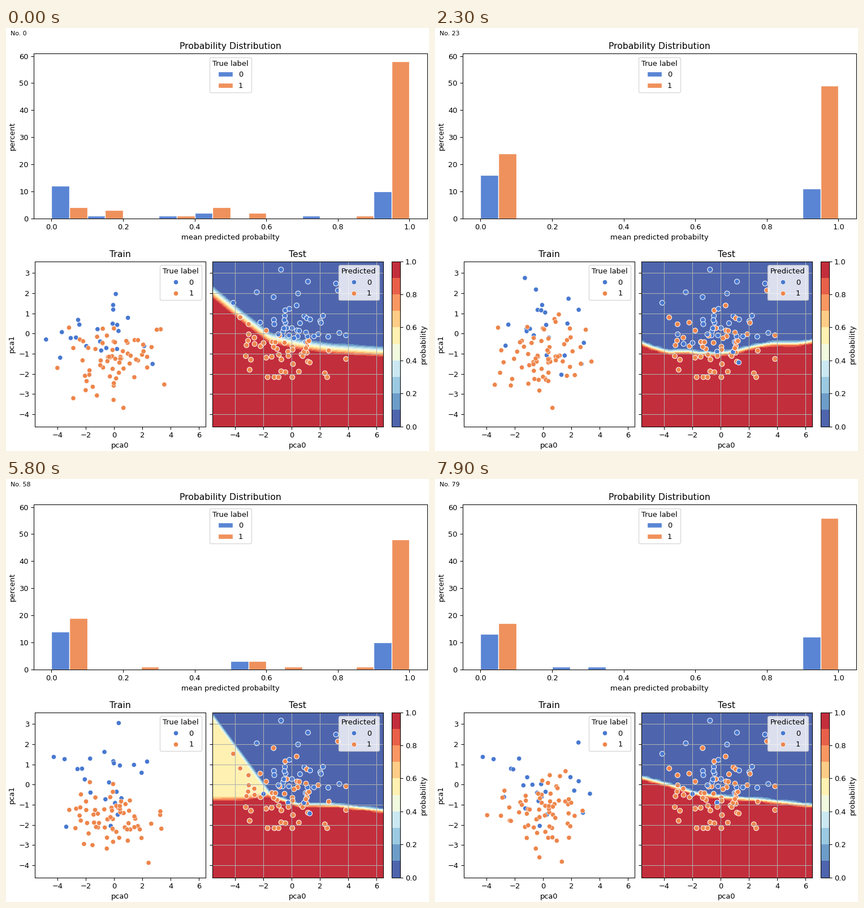
Write a matplotlib script that moves like this. It is 748 by 748 pixels and loops after 8000 ms.

```python
import numpy as np
import matplotlib.pyplot as plt
from matplotlib.animation import FuncAnimation
from matplotlib.cm import ScalarMappable
from matplotlib.colors import BoundaryNorm, ListedColormap, to_rgba
from matplotlib.lines import Line2D
from matplotlib.patches import Patch

SIZE, INCHES, FRAMES = 748, 8, 80
COLORS = ["#4878d0", "#ee854a"]
RGBA = np.array([to_rgba(c) for c in COLORS])
XLIM, YLIM = (-5.6, 6.45), (-4.6, 3.575)
TOTALS = np.array([27, 73])
LIFE = 30  # frames a training point stays in the sliding window

KEYS = np.array([0, 14, 32, 44, 58, 70, 79])

# Per key time and label: share in the first bin, then {bin: count} between
# the first and the last bin; the last bin takes the rest.
LOW = [(12, 4), (17, 28), (16, 19), (17, 25), (14, 19), (12, 10), (13, 17)]
MIDDLE = [
    ({1: 1, 3: 1, 4: 2, 7: 1}, {1: 3, 3: 1, 4: 4, 5: 2, 8: 1}),
    ({}, {}),
    ({}, {2: 1, 7: 1}),
    ({3: 1}, {3: 1}),
    ({5: 3}, {2: 1, 5: 3, 6: 1, 8: 1}),
    ({7: 1, 8: 5}, {8: 6}),
    ({2: 1, 3: 1}, {}),
]

# Decision boundary: heights at a few x positions per key time.
NODES = [-5.6, -3.6, -1.6, .4, 2.9, 6.45]
HEIGHTS = [
    [2.05, .88, -.2, -.53, -.75, -.91],
    [-.76, -1.78, -1.57, -.87, -.42, .33],
    [.03, -.2, -.52, -.8, -1, -.9],
    [-.66, -.74, -.76, -.98, -1.01, -1.04],
    [-.75, -.73, -.55, -1, -1.03, -1.3],
    [.55, .08, -.5, -.74, -1, -1.04],
    [.33, -.05, -.49, -.65, -.78, -1.05],
]
# Plateau of intermediate probability below a sloping line: intercept, slope.
WEDGE = {4: (-1.92, -.95), 5: (-1.03, -1.28)}
PLATEAU = np.array([.55, .55, .55, .55, .55, .85, .85])
WIDTH = np.array([.62, .3, .27, .25, .25, .28, .25])

rng = np.random.default_rng(7)


def blend(stack, i):
    k = min(np.searchsorted(KEYS, i, side="right") - 1, len(KEYS) - 2)
    f = (i - KEYS[k]) / (KEYS[k + 1] - KEYS[k])
    return (1 - f) * stack[k] + f * stack[k + 1]


def cloud(n, center, spread, low, high):
    return np.clip(rng.normal(center, spread, (n, 2)), low, high)


def stream(per_frame, *shape):
    """Points and the frames at which they enter the sliding window."""
    n = per_frame * (FRAMES + LIFE) // LIFE
    return cloud(n, *shape), np.linspace(-LIFE, FRAMES, n)


blue, blue_start = stream(23, (0, .35), (2, 1.2), (-4.8, -2.6), (5.9, 3.1))
orange, orange_start = stream(68, (0, -1.2), (1.75, .95), (-4, -4.2), (5, 1.55))
train_xy = np.vstack([blue, orange])
train_start = np.concatenate([blue_start, orange_start])
train_label = np.repeat([0, 1], [len(blue), len(orange)])

test_xy = cloud(93, (-.1, 0), (1.75, 1.25), (-5.08, -2.16), (3.84, 3.2))
# Offset of each test point along the components that are not shown.
hidden = np.maximum(rng.normal(.6, 1, len(test_xy)), -.4)

counts = np.zeros((len(KEYS), 2, 10))
for k, pair in enumerate(MIDDLE):
    counts[k, :, 0] = LOW[k]
    for label, bins in enumerate(pair):
        for b, n in bins.items():
            counts[k, label, b] = n

gx, gy = np.linspace(*XLIM, 81), np.linspace(*YLIM, 56)
lower = np.array([np.interp(gx, NODES, h) for h in HEIGHTS])
upper = lower.copy()
for k, (intercept, slope) in WEDGE.items():
    upper[k] = np.maximum(lower[k], intercept + slope * gx)


def edges(i):
    """Both boundary curves, slightly refitted on every frame."""
    phase = np.random.default_rng(i).uniform(0, 2 * np.pi)
    wobble = .03 * min(np.abs(KEYS - i).min(), 4) * np.sin(1.1 * gx + phase)
    return blend(lower, i) + wobble, blend(upper, i) + wobble


def probability(i, low, up):
    width, plateau = blend(WIDTH, i), blend(PLATEAU, i)

    def step(edge):
        w = width * np.clip(np.hypot(1, np.gradient(edge, gx)), 1, 2)
        return np.clip((edge - gy[:, None]) / w + .5, 0, 1)

    return np.clip(plateau * step(up) + (1 - plateau) * step(low), .001, .999)


fig = plt.figure(figsize=(INCHES, INCHES), dpi=SIZE / INCHES, facecolor="white")


def place(left, top, right, bottom):
    return fig.add_axes([left / SIZE, 1 - bottom / SIZE,
                         (right - left) / SIZE, (bottom - top) / SIZE])


def dot_legend(ax, title):
    handles = [Line2D([], [], ls="", marker="o", ms=6.4, mfc=c, mec="white",
                      mew=.5, label=str(n)) for n, c in enumerate(COLORS)]
    ax.legend(handles=handles, title=title, loc="upper right")


number = fig.text(7.5 / SIZE, 1 - 13 / SIZE, "", fontsize=8.5)

ax_hist = place(48.8, 45.2, 745.1, 336.5)
ax_hist.set(xlim=(-.05, 1.05), ylim=(0, 60.9), title="Probability Distribution",
            xlabel="mean predicted probabilty", ylabel="percent")
bar_styles = [dict(fc=to_rgba(c, .9), ec="white", lw=1) for c in COLORS]
bars = [ax_hist.bar(np.arange(10) / 10 + .05 * n, np.zeros(10), .05,
                    align="edge", **style) for n, style in enumerate(bar_styles)]
ax_hist.legend(handles=[Patch(label=str(n), **style)
                        for n, style in enumerate(bar_styles)],
               title="True label", loc="upper center")

ax_train = place(50.8, 412.6, 352.7, 704.5)
ax_test = place(365.4, 412.6, 666.5, 704.5)
for ax, title in ((ax_train, "Train"), (ax_test, "Test")):
    ax.set(xlim=XLIM, ylim=YLIM, title=title, xlabel="pca0",
           xticks=range(-4, 7, 2), yticks=range(-4, 4))
ax_train.set_ylabel("pca1")
ax_test.tick_params(labelleft=False)
ax_test.grid(True)
train_dots = ax_train.scatter([], [], s=41, lw=.5, ec="white")
test_dots = ax_test.scatter(*test_xy.T, s=46, lw=.8, ec="white")
dot_legend(ax_train, "True label")
dot_legend(ax_test, "Predicted")

levels = np.linspace(0, 1, 11)
bands = ListedColormap(.9 * plt.get_cmap("RdYlBu_r")(np.arange(.05, 1, .1)) + .1)
norm = BoundaryNorm(levels, 10)
colorbar = fig.colorbar(ScalarMappable(norm, bands), ticks=levels[::2],
                        cax=place(682.4, 412.6, 696.6, 704.5), label="probability")
colorbar.minorticks_off()
surface = []


def update(i):
    number.set_text(f"No. {i}")

    heights = np.rint(blend(counts, i))
    heights[:, 9] = TOTALS - heights[:, :9].sum(axis=1)
    for group, row in zip(bars, heights):
        for bar, h in zip(group, row):
            bar.set_height(h)
            bar.set_visible(h > 0)

    shown = (train_start <= i) & (i < train_start + LIFE)
    train_dots.set_offsets(train_xy[shown])
    train_dots.set_facecolor(RGBA[train_label[shown]])

    low, up = edges(i)
    x, y = test_xy.T
    drift = .2 + 1.6 * min(i / KEYS[1], 1)
    test_dots.set_facecolor(RGBA[(y - drift * hidden < np.interp(x, gx, up)).astype(int)])

    while surface:
        surface.pop().remove()
    surface.append(ax_test.contourf(gx, gy, probability(i, low, up), levels=levels,
                                    cmap=bands, norm=norm, zorder=.5))
    return []


anim = FuncAnimation(fig, update, frames=FRAMES, interval=100, repeat=True,
                     repeat_delay=0, blit=False)
plt.show()
```
